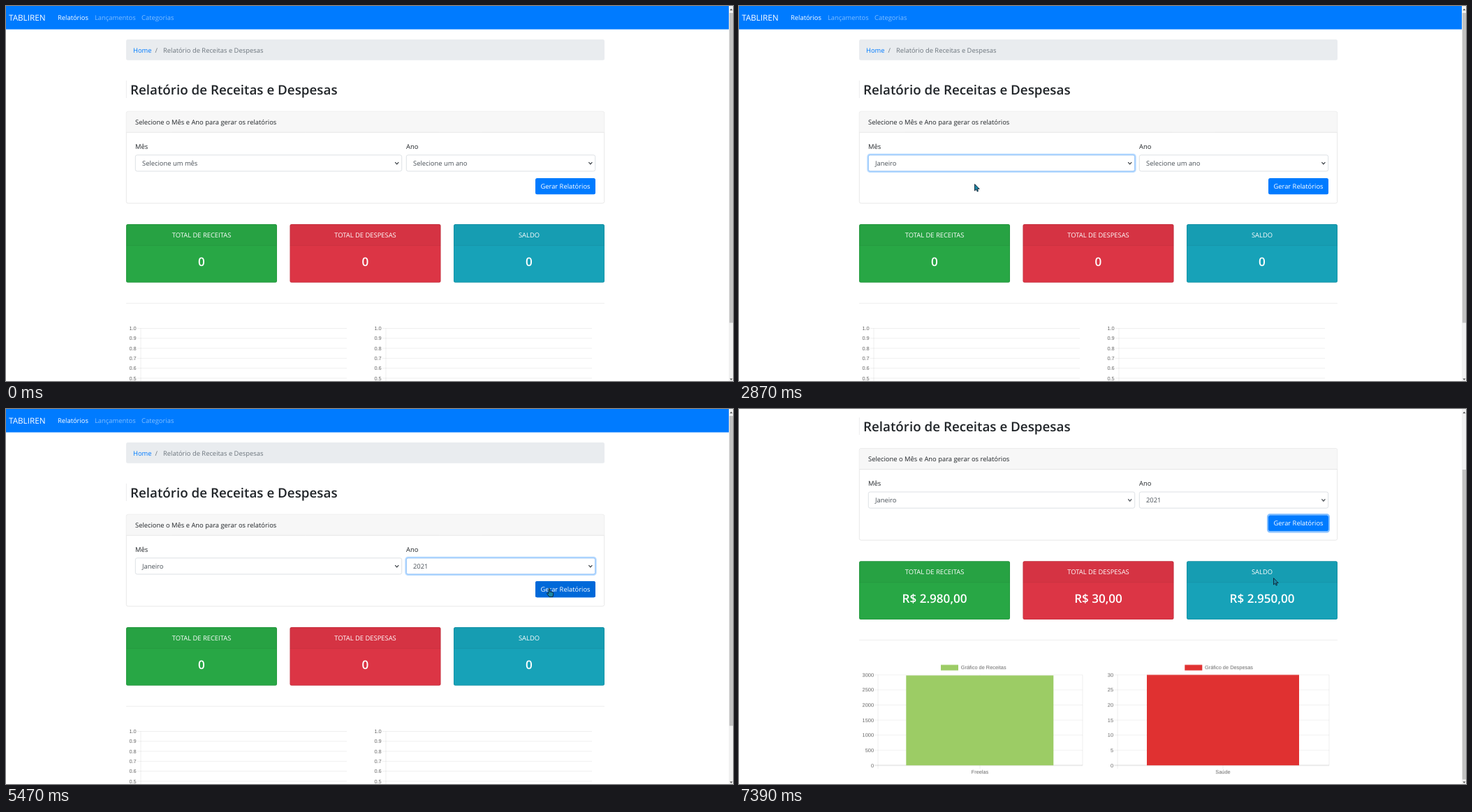
Write an HTML page that moves like this. It is 1041x538 px and loops after 8 s.

```html
<!DOCTYPE html>
<html lang="pt-BR">
<head>
<meta charset="utf-8">
<title>Relatório de Receitas e Despesas</title>
<style>
html, body { margin: 0; width: 100%; height: 100%; overflow: hidden; background: #fff; }
svg { display: block; width: 1041px; height: 538px; }
text { font: 9.38px "Open Sans", "Noto Sans", sans-serif; text-rendering: geometricPrecision; fill: #212529; }
.mid { text-anchor: middle; }
.end { text-anchor: end; }
.white, .white text { fill: #fff; }
.dim { fill: #fff; opacity: .5; }
.muted { fill: #6c757d; }
.field, .list text { fill: #495057; }
.list .white text { fill: #fff; }
.brand { font-size: 11.7px; }
.title { font-size: 18.8px; font-weight: 600; }
.value { font-size: 17.1px; font-weight: 600; }
.chart text { font: 7.4px "Liberation Sans", Arial, sans-serif; fill: #666; }
.grid { stroke: #000; stroke-opacity: .1; stroke-width: .62; fill: none; }
.zero { stroke-opacity: .27; }
.box { fill: #fff; stroke: #ced4da; stroke-width: .7; }
.focus { fill: none; stroke: #b9dbff; stroke-width: 2; }
.focus + rect { stroke: #80bdff; stroke-width: .8; fill: none; }
.chev { fill: none; stroke: #343a40; stroke-width: 1.2; }

.anim, .anim * { animation: 8s step-end infinite; }
.anim * { animation-name: none; }
#page { animation: scroll 8s infinite; }
#thumb { animation: thumb 8s infinite; }
#cursor { animation: move 8s infinite; }
.bar { transform-box: fill-box; transform-origin: 50% 100%; animation: grow 8s infinite; }
.mBefore { animation-name: mBefore; }
.mAfter { animation-name: mAfter; }
.mRing { animation: mRing 8s linear infinite; }
.mList { animation-name: mList; }
.yBefore { animation-name: yBefore; }
.yAfter { animation-name: yAfter; }
.yRing { animation: yRing 8s linear infinite; }
.yList { animation-name: yList; }
.hover { animation: hover 8s linear infinite; }
.bRing { animation: bRing 8s linear infinite; }
.before { animation-name: before; }
.after { animation-name: after; }
.arrow { animation-name: arrow; }
.hand { animation-name: hand; }
#mPick rect { animation: mPick 8s step-end infinite; }
#yPick rect { animation: yPick 8s step-end infinite; }

@keyframes mBefore { 0% { opacity: 1 } 34.75%, 100% { opacity: 0 } }
@keyframes mAfter { 0% { opacity: 0 } 34.75%, 100% { opacity: 1 } }
@keyframes mRing { 0%, 19.4% { opacity: 0 } 21%, 43.3% { opacity: 1 } 45%, 100% { opacity: 0 } }
@keyframes mList { 0% { opacity: 0 } 21% { opacity: 1 } 34.75%, 100% { opacity: 0 } }
@keyframes yBefore { 0% { opacity: 1 } 58.75%, 100% { opacity: 0 } }
@keyframes yAfter { 0% { opacity: 0 } 58.75%, 100% { opacity: 1 } }
@keyframes yRing { 0%, 43.3% { opacity: 0 } 44.5%, 70.9% { opacity: 1 } 72.4%, 100% { opacity: 0 } }
@keyframes yList { 0% { opacity: 0 } 44.5% { opacity: 1 } 58.75%, 100% { opacity: 0 } }
@keyframes hover { 0%, 67.4% { opacity: 0 } 68.375%, 82% { opacity: 1 } 83.6%, 100% { opacity: 0 } }
@keyframes bRing { 0%, 70.9% { opacity: 0 } 72.4%, 100% { opacity: 1 } }
@keyframes before { 0% { opacity: 1 } 79%, 100% { opacity: 0 } }
@keyframes after { 0% { opacity: 0 } 79%, 100% { opacity: 1 } }
@keyframes arrow { 0% { opacity: 0 } 5.5% { opacity: 1 } 67.4% { opacity: 0 } 82.875%, 100% { opacity: 1 } }
@keyframes hand { 0% { opacity: 0 } 67.4% { opacity: 1 } 82.875%, 100% { opacity: 0 } }
@keyframes mPick { 0% { transform: none } 29.7%, 100% { transform: translateY(13.68px) } }
@keyframes yPick {
  0% { transform: none }
  48.1% { transform: translateY(13.68px) }
  49.9% { transform: translateY(27.36px) }
  51.8% { transform: translateY(41.04px) }
  53.6% { transform: translateY(54.72px) }
  55.4%, 100% { transform: translateY(68.4px) }
}
@keyframes grow {
  0%, 77.75% { transform: scaleY(0); animation-timing-function: cubic-bezier(.25, 1, .5, 1) }
  90.25%, 100% { transform: none }
}
@keyframes scroll {
  0%, 84.4% { transform: none; animation-timing-function: cubic-bezier(.35, .2, .4, 1) }
  92.375%, 100% { transform: translateY(-94.8px) }
}
@keyframes thumb {
  0%, 84.4% { transform: none; animation-timing-function: cubic-bezier(.35, .2, .4, 1) }
  92.375%, 100% { transform: translateY(77px) }
}
@keyframes move {
  0%, 5.5% { transform: translate(880px, 242px); animation-timing-function: steps(2) }
  7.5%, 9.125% { transform: translate(515px, 208px); animation-timing-function: steps(8) }
  17.125%, 22.03% { transform: translate(429px, 224px); animation-timing-function: steps(9) }
  30.75%, 35.9% { transform: translate(337px, 255px); animation-timing-function: steps(8) }
  43.5%, 45.15% { transform: translate(618px, 220px); animation-timing-function: steps(4) }
  49.125% { transform: translate(607px, 261px); animation-timing-function: steps(7) }
  55.875%, 61.525% { transform: translate(599px, 309px); animation-timing-function: steps(7) }
  68.375%, 79.875% { transform: translate(777px, 257px); animation-timing-function: steps(3) }
  82.875%, 100% { transform: translate(765px, 242px) }
}
</style>
</head>
<body>
<svg viewBox="0 0 1041 538">
  <defs>
    <clipPath id="mPick"><rect x="186" y="237.2" width="381" height="13.68"/></clipPath>
    <clipPath id="yPick"><rect x="573" y="237.2" width="271" height="13.68"/></clipPath>
  </defs>
  <g id="page">
    <rect width="1035" height="33.5" fill="#007bff"/>
    <text class="white brand" x="4" y="20.7">TABLIREN</text>
    <text class="white" x="74" y="19.8">Relatórios</text>
    <text class="dim" x="127" y="19.8">Lançamentos</text>
    <text class="dim" x="194" y="19.8">Categorias</text>

    <rect x="172" y="48" width="685" height="29.7" rx="2.5" fill="#e9ecef"/>
    <text x="182" y="66.8" style="fill:#007bff">Home</text>
    <text class="muted" x="213.5" y="66.8">/</text>
    <text class="muted" x="225" y="66.8">Relatório de Receitas e Despesas</text>

    <path d="M172.4 107V132" stroke="#e4e6e8" stroke-width=".7"/>
    <text class="title" x="178" y="126.7">Relatório de Receitas e Despesas</text>

    <rect x="172.3" y="151.3" width="684.4" height="131.7" rx="2.5" fill="#fff" stroke="#dfdfdf" stroke-width=".7"/>
    <path d="M172.6 181.2V154q0-2.4 2.4-2.4H854q2.4 0 2.4 2.4V181.2z" fill="#f7f7f7"/>
    <path d="M172.5 181.3H856.5" stroke="#dfdfdf" stroke-width=".7"/>
    <text x="185" y="169.8">Selecione o Mês e Ano para gerar os relatórios</text>
    <text x="185" y="204.8">Mês</text>
    <text x="573" y="204.8">Ano</text>

    <rect class="box" x="185.3" y="213.8" width="381.4" height="23.2" rx="2.5"/>
    <rect class="box" x="573.3" y="213.8" width="270.4" height="23.2" rx="2.5"/>
    <g class="anim">
      <g class="mRing"><rect class="focus" x="184.3" y="212.7" width="383.4" height="25.4" rx="3.4"/><rect x="185.3" y="213.8" width="381.4" height="23.2" rx="2.5"/></g>
      <g class="yRing"><rect class="focus" x="572.3" y="212.7" width="272.4" height="25.4" rx="3.4"/><rect x="573.3" y="213.8" width="270.4" height="23.2" rx="2.5"/></g>
      <text class="field mBefore" x="195" y="229">Selecione um mês</text>
      <text class="field mAfter" x="195" y="229">Janeiro</text>
      <text class="field yBefore" x="583" y="229">Selecione um ano</text>
      <text class="field yAfter" x="583" y="229">2021</text>
    </g>
    <path class="chev" d="M557.2 224.2l2.5 2.6 2.5-2.6M834.4 224.2l2.5 2.6 2.5-2.6"/>

    <rect x="758" y="247" width="86" height="23.2" rx="2.5" fill="#007bff"/>
    <g class="anim">
      <rect class="hover" x="758" y="247" width="86" height="23.2" rx="2.5" fill="#0069d9"/>
      <rect class="bRing" x="757" y="246" width="88" height="25.2" rx="3.5" fill="none" stroke="#80bdff" stroke-width="2"/>
    </g>
    <text class="white mid" x="801" y="261.9">Gerar Relatórios</text>

    <g id="totals" class="anim"></g>
    <path class="grid" d="M172 426.5H857"/>

    <g class="chart anim">
      <g id="empty" class="before"></g>
      <g id="full" class="after"></g>
    </g>
    <g class="anim">
      <g id="months" class="list mList"></g>
      <g id="years" class="list yList"></g>
    </g>
  </g>

  <rect x="1035" width="6" height="538" fill="#f1f1f1"/>
  <rect id="thumb" x="1035.8" y="10" width="5.2" height="444.5" fill="#c1c1c1"/>
  <path d="M1036.4 6.2l2-2.4 2 2.4zM1036.4 534.5l2 2.4 2-2.4z" fill="#505050"/>

  <g id="cursor">
    <g class="anim" stroke="#10202e" stroke-width=".9" stroke-linejoin="round" fill="#1b87a6">
      <path class="arrow" d="M.5 .6V10L2.7 8.1 4.2 11.2 5.6 10.5 4.2 7.5H7.2z"/>
      <path class="hand" d="M0 1Q.8-.2 1.7 1V5L6 6Q7 6.4 6.8 8L6 12.4H1L-2.6 7.6Q-2.2 6.2 0 7.6z"/>
    </g>
  </g>
</svg>
<script>
const $ = id => document.getElementById(id);
const text = (x, y, s, cls = '') => `<text class="${cls}" x="${x}" y="${y}">${s}</text>`;
const rect = (x, y, w, h, fill, more = '') =>
  `<rect x="${x}" y="${y}" width="${w}" height="${h}" fill="${fill}" ${more}/>`;
const line = (d, cls = '') => `<path class="grid ${cls}" d="${d}"/>`;

// Summary cards
$('totals').innerHTML = [
  [172, '#28a745', 'TOTAL DE RECEITAS', 'R$ 2.980,00'],
  [406.5, '#dc3545', 'TOTAL DE DESPESAS', 'R$ 30,00'],
  [641, '#17a2b8', 'SALDO', 'R$ 2.950,00']
].map(([x, color, name, value]) =>
  rect(x, 313, 216, 83.7, color, 'rx="2.5"') +
  rect(x + .3, 313.3, 215.4, 83.1, 'none', 'rx="2.5" stroke="#000" stroke-opacity=".125" stroke-width=".7"') +
  rect(x, 313, 216, 30.5, '#000', 'rx="2" fill-opacity=".03"') +
  line(`M${x} 343.6h216`) +
  text(x + 108, 331.8, name, 'white mid') +
  text(x + 108, 373, '0', 'white value mid before') +
  text(x + 108, 373, value, 'white value mid after')
).join('');

// Charts with no data
$('empty').innerHTML = [193, 544].map(x => {
  let out = line(`M${x} 462.5V606`);
  for (let i = 0; i <= 10; i++) {
    const y = 462.5 + i * 14.3;
    out += line(`M${x - 5} ${y}h300`) + text(x - 6.3, y + 2.5, (1 - i / 10).toFixed(1), 'end');
  }
  return out;
}).join('');

// Charts with data
const chart = (x, right, mid, barX, barW, max, value, color, lx, name, label) => {
  const top = 476.2, base = 606, h = (base - top) * value / max;
  let out = line(`M${x} ${top}V${base + 5}M${mid} ${top}V${base + 5}M${right} ${top}V${base}`);
  for (let i = 0; i <= 6; i++) {
    const y = top + i * (base - top) / 6;
    out += line(`M${x - 5} ${y}H${right}`, i == 6 ? 'zero' : '') +
      text(x - 6, y + 2.5, max - i * max / 6, 'end');
  }
  return out + rect(barX, base - h, barW, h, color, 'class="bar"') +
    rect(lx, 461.8, 25, 8, color) + text(lx + 28.7, 468.3, name) +
    text(mid, 617.6, label, 'mid');
};
$('full').innerHTML =
  chart(199, 492, 345, 239.3, 211, 3000, 2980, '#9ccc65', 289, 'Gráfico de Receitas', 'Freelas') +
  chart(542, 845, 693, 584, 218, 30, 30, '#e03131', 638.3, 'Gráfico de Despesas', 'Saúde');

// Drop-down lists: plain rows plus a clipped highlighted copy
const list = (id, x, w, clip, names) => {
  const top = 237.2, row = 13.68, h = row * names.length;
  const rows = names.map((s, i) => text(x + 10, top + 10.3 + i * row, s)).join('');
  $(id).innerHTML = rect(x, top, w, h, '#fff') + rows +
    `<g class="white" clip-path="url(#${clip})">${rect(x, top, w, h, '#1e90ff')}${rows}</g>` +
    `<path d="M${x + .3} ${top}v${h}" stroke="#767676" stroke-width=".7"/>`;
};
list('months', 186, 380.7, 'mPick', ['Selecione um mês', 'Janeiro', 'Fevereiro', 'Março', 'Abril', 'Maio',
  'Junho', 'Julho', 'Agosto', 'Setembro', 'Outubro', 'Novembro', 'Dezembro']);
list('years', 573.5, 270.3, 'yPick', ['Selecione um ano', 2017, 2018, 2019, 2020, 2021]);
$('months').innerHTML += '<path d="M566.5 237.2V415.2" stroke="#767676" stroke-width=".7"/>' +
  '<path d="M186 415.3H566.5" stroke="#c8c8c8" stroke-width=".6"/>';
</script>
</body>
</html>
```
